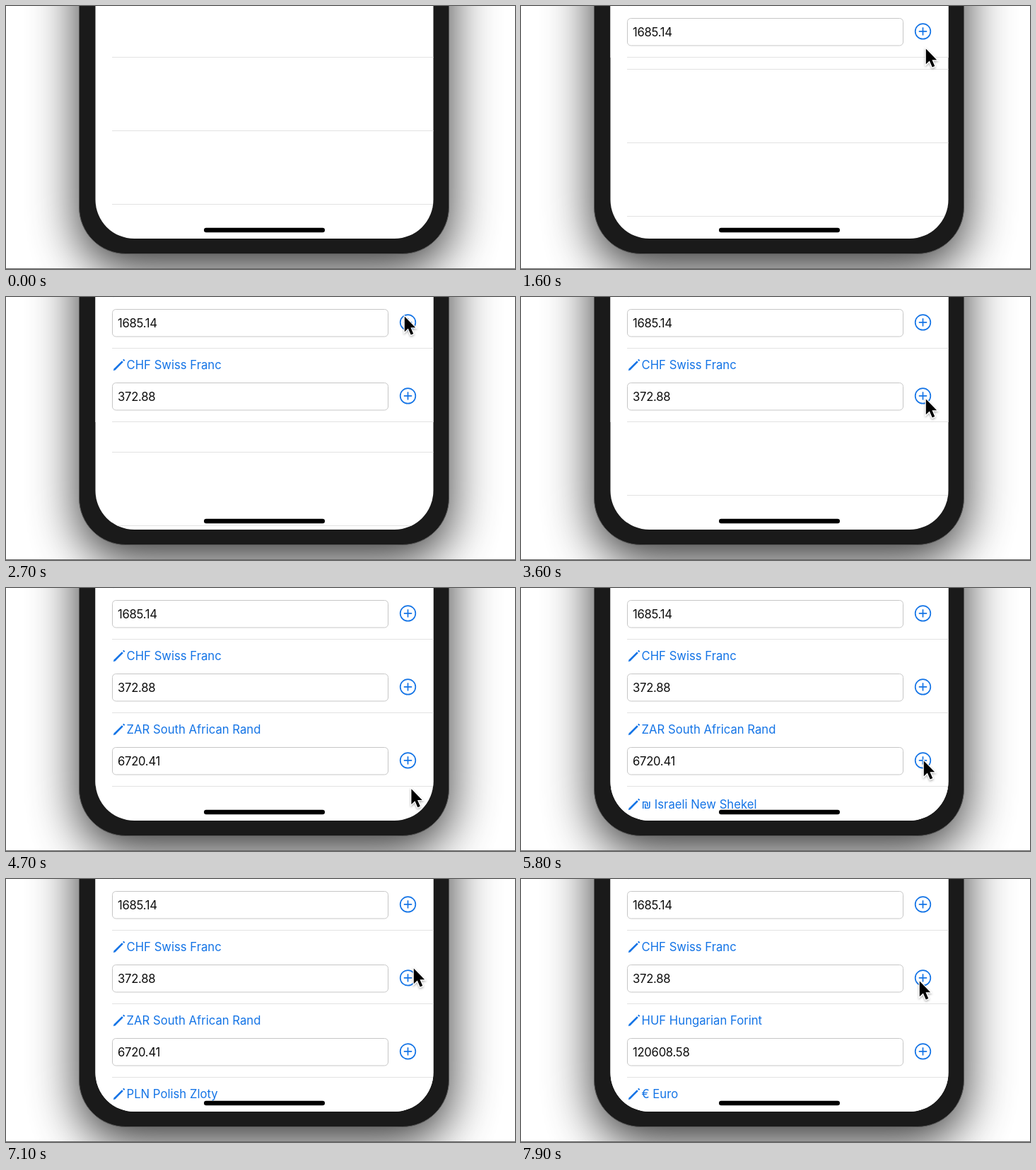
An HTML page that plays this animation: 720 by 372 pixels, repeating every 8 s.

```html
<!DOCTYPE html>
<html lang="en">
<head>
<meta charset="utf-8">
<title>Currency list</title>
<style>
  html, body { margin: 0; width: 100%; height: 100%; overflow: hidden; background: #fff; }
  svg { display: block; width: 100vw; height: 100vh; }
  text { font-family: Inter, Roboto, sans-serif; font-size: 16.7px; }
  .label { fill: #1474e6; }
  .value { fill: #0c0c0c; letter-spacing: -.3px; }
  .icon { fill: none; stroke: #1474e6; stroke-width: 1.7; }
  .field { fill: #fff; stroke: #c6c6c6; }
  .rule { fill: #e2e2e2; }
</style>
</head>
<body>
<svg viewBox="0 0 720 372">
  <defs>
    <filter id="blur" filterUnits="userSpaceOnUse" x="-150" y="-450" width="1020" height="1000">
      <feGaussianBlur stdDeviation="35"/>
    </filter>
    <filter id="soft" x="-50%" y="-50%" width="200%" height="200%">
      <feDropShadow dx="0" dy="1.5" stdDeviation="1.5" flood-opacity=".35"/>
    </filter>
    <clipPath id="screen"><rect x="126.5" y="-200" width="478" height="529" rx="55"/></clipPath>
  </defs>
  <rect width="720" height="372" fill="#fff"/>
  <rect x="103" y="-350" width="524" height="722" rx="66" opacity=".8" filter="url(#blur)"/>
  <rect x="103.5" y="-200" width="523" height="550.5" rx="66" fill="#1a1a1a" stroke="#585858"/>
  <g clip-path="url(#screen)">
    <rect x="126" y="-200" width="479" height="529" fill="#fff"/>
    <g id="list"></g>
  </g>
  <rect x="280" y="313.8" width="171" height="6.4" rx="3.2"/>
  <rect y="371" width="720" height="1" fill="#686868"/>
  <g id="cursor" filter="url(#soft)">
    <path transform="translate(.8 2.5) scale(.93)" d="M0 0V23.5L5.4 18.4L9.6 28L13.4 26.4L9.3 17H16.5Z" stroke="#fff" stroke-width="2.4" paint-order="stroke"/>
  </g>
</svg>
<script>
const LOOP = 8000, STEP = 100, ROW = 104, TOP = -32, SLIDE = 310;
const list = document.getElementById('list');
const cursor = document.getElementById('cursor');

const insert = (at, slot, name, value = '') => ({ at, slot, name, value });

// Insertions in order; each pushes the rows at or below its slot down by one.
const rows = [
  ...[0, 1, 2, 3].map(slot => insert(-LOOP, slot)),
  insert(695, 0),
  insert(1512, 1, '', '1685.14'),
  insert(2559, 2, 'CHF Swiss Franc', '372.88'),
  insert(3795, 3, 'ZAR South African Rand', '6720.41'),
  insert(4795, 4, '₪ Israeli New Shekel'),
  insert(5769, 4, 'PLN Polish Zloty'),
  insert(7575, 3, '€ Euro'),
  insert(7575, 3, 'HUF Hungarian Forint', '120608.58')
];

// The pointer rests between moves; bend bows a move to the right.
const entry = { at: 1600, x: 572, y: 58 };
const moves = [
  { from: 1600, to: 2300, x: 563, y: 25, bend: 0 },
  { from: 2800, to: 3600, x: 572, y: 142, bend: 10 },
  { from: 3800, to: 4100, x: 573, y: 286, bend: 0 },
  { from: 4500, to: 5400, x: 569, y: 242, bend: 0 },
  { from: 6300, to: 7100, x: 576, y: 124, bend: 20 },
  { from: 7200, to: 7400, x: 563, y: 142, bend: 0 }
];

const clamp = v => Math.max(0, Math.min(1, v));
const ease = v => v < .5 ? 2 * v * v : 1 - 2 * (1 - v) ** 2;

function rowMarkup({ name, value }) {
  const rule = `<rect class="rule" x="150" y="${ROW}" width="455" height="1"/>`;
  if (name === undefined) return rule;
  return `<rect x="126" y="1" width="479" height="${ROW}" fill="#fff"/>${rule}
    <path class="icon" style="stroke-width:2.7" d="M153.8 30.2L164.9 19.1M166 18L167.4 16.6"/>
    <path fill="#1474e6" d="M151.8 32.2L152.9 28.5L155.5 31.1Z"/>
    <text class="label" x="170.5" y="30">${name}</text>
    <rect class="field" x="150.5" y="49.5" width="390" height="38.5" rx="5"/>
    <text class="value" x="158" y="74.6">${value}</text>
    <circle class="icon" cx="568.5" cy="67.9" r="10.8"/>
    <path class="icon" d="M562.8 67.9h11.4M568.5 62.2v11.4"/>`;
}

for (const row of rows) {
  row.el = document.createElementNS('http://www.w3.org/2000/svg', 'g');
  row.el.innerHTML = rowMarkup(row);
  list.append(row.el);
}

function pointAt(t) {
  let { x, y } = entry;
  for (const m of moves) {
    const k = ease(clamp((t - m.from) / (m.to - m.from)));
    x += (m.x - x) * k + m.bend * Math.sin(Math.PI * k);
    y += (m.y - y) * k;
  }
  return [x, y];
}

function render(t) {
  const shift = rows.map(r => ease(clamp((t - r.at) / SLIDE)));
  rows.forEach((row, i) => {
    let slot = row.slot, pos = slot;
    for (let j = i + 1; j < rows.length; j++) {
      if (rows[j].slot <= slot) { slot++; pos += shift[j]; }
    }
    const y = Math.round(TOP + ROW * (pos - 1));
    row.el.setAttribute('transform', `translate(0 ${y})`);
    row.el.setAttribute('opacity', clamp((shift[i] - .05) / .1));
  });
  cursor.setAttribute('visibility', t < entry.at ? 'hidden' : 'visible');
  cursor.setAttribute('transform', `translate(${pointAt(t)})`);
}

const start = performance.now();
function frame() {
  const t = (performance.now() - start) % LOOP;
  render(Math.floor(t / STEP) * STEP);
  requestAnimationFrame(frame);
}
frame();
</script>
</body>
</html>
```
